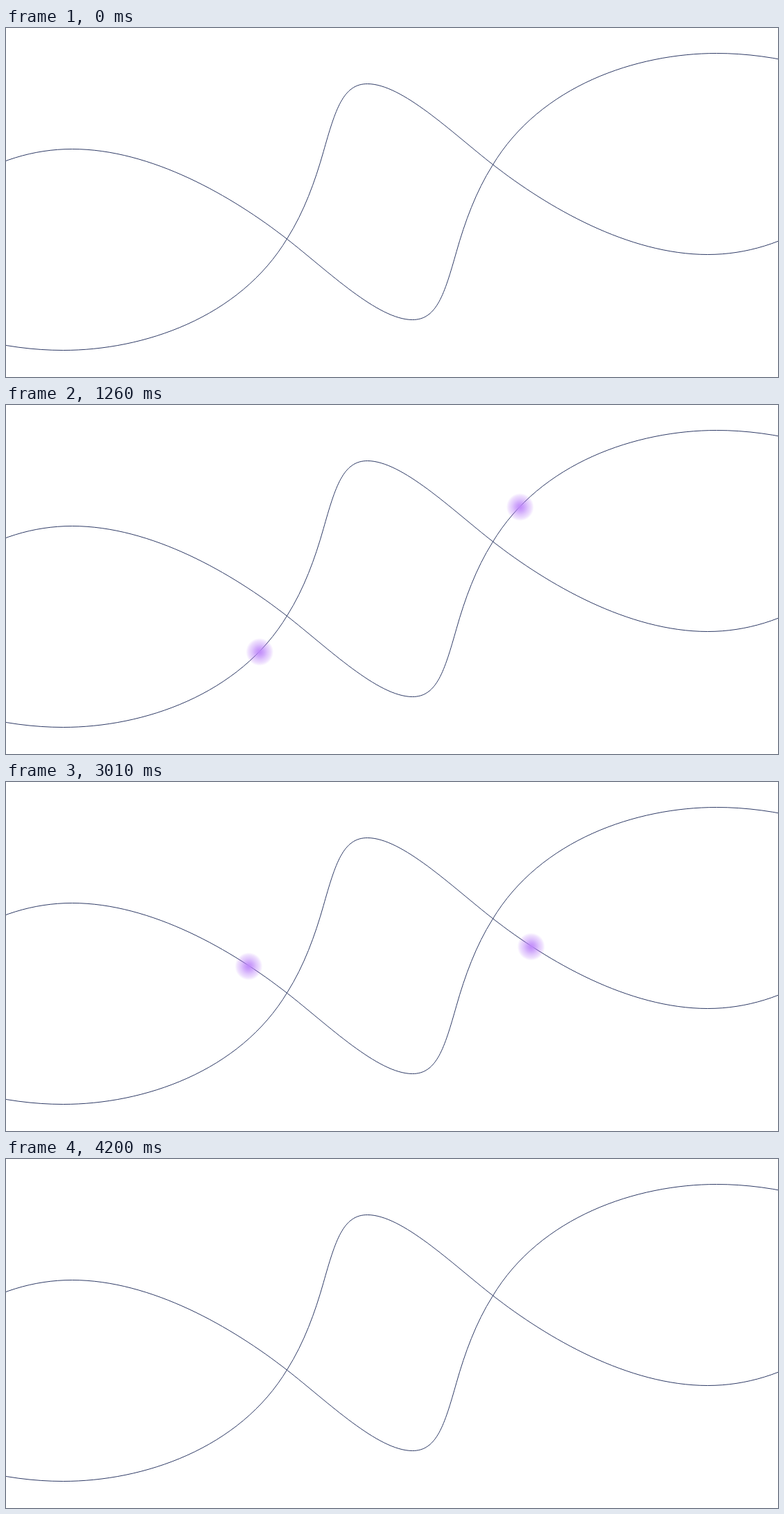
Write an HTML page that moves like this. It is 1114 by 503 pixels and loops after 4270 ms.

```html
<!DOCTYPE html>
<html lang="en">
<head>
<meta charset="utf-8">
<title>Crossing curves</title>
<style>
  html, body { margin: 0; width: 100%; height: 100%; overflow: hidden; background: #fff; }
  svg { display: block; }
  .line { fill: none; stroke: #2f3b66; stroke-width: 1; }
</style>
</head>
<body>
<svg width="1114" height="503" viewBox="0 0 1114 503">
  <defs>
    <radialGradient id="glow">
      <stop offset="0" stop-color="#c08afa"/>
      <stop offset=".25" stop-color="#ba80f9" stop-opacity=".75"/>
      <stop offset=".55" stop-color="#b374f8" stop-opacity=".42"/>
      <stop offset=".82" stop-color="#b06cf8" stop-opacity=".2"/>
      <stop offset="1" stop-color="#b06cf8" stop-opacity="0"/>
    </radialGradient>
    <path id="curve" d="M-45 447.5C-5 458.5 40 464.5 82.5 464.5
      C198 464.5 337 418 406 303
      C430 265 446 221 458 178.5
      C475.5 117 486.5 80.5 521.5 80.5
      C571.5 80.5 643 150.5 702.5 196.8
      C781 258 898 326.5 1012.5 326.5
      C1068.5 326.5 1122.5 309.5 1170 278.5"/>
  </defs>
  <use href="#curve" class="line"/>
  <use href="#curve" class="line" transform="rotate(180 554 250.5)"/>
  <circle class="dot" r="20" fill="url(#glow)"/>
  <circle class="dot" r="20" fill="url(#glow)"/>
</svg>
<script>
  const LOOP = 4270, STEP = 70, SPEED = 0.35; // ms, ms, px per ms
  const curve = document.getElementById('curve');
  const [first, second] = document.querySelectorAll('.dot');

  function place(dot, x, y) {
    dot.setAttribute('cx', x);
    dot.setAttribute('cy', y + 1);
  }

  function draw() {
    const time = Math.floor(performance.now() % LOOP / STEP) * STEP;
    const { x, y } = curve.getPointAtLength(time * SPEED);
    place(first, x, y);
    place(second, 1108 - x, 501 - y); // half-turn about the centre
    requestAnimationFrame(draw);
  }
  draw();
</script>
</body>
</html>
```
